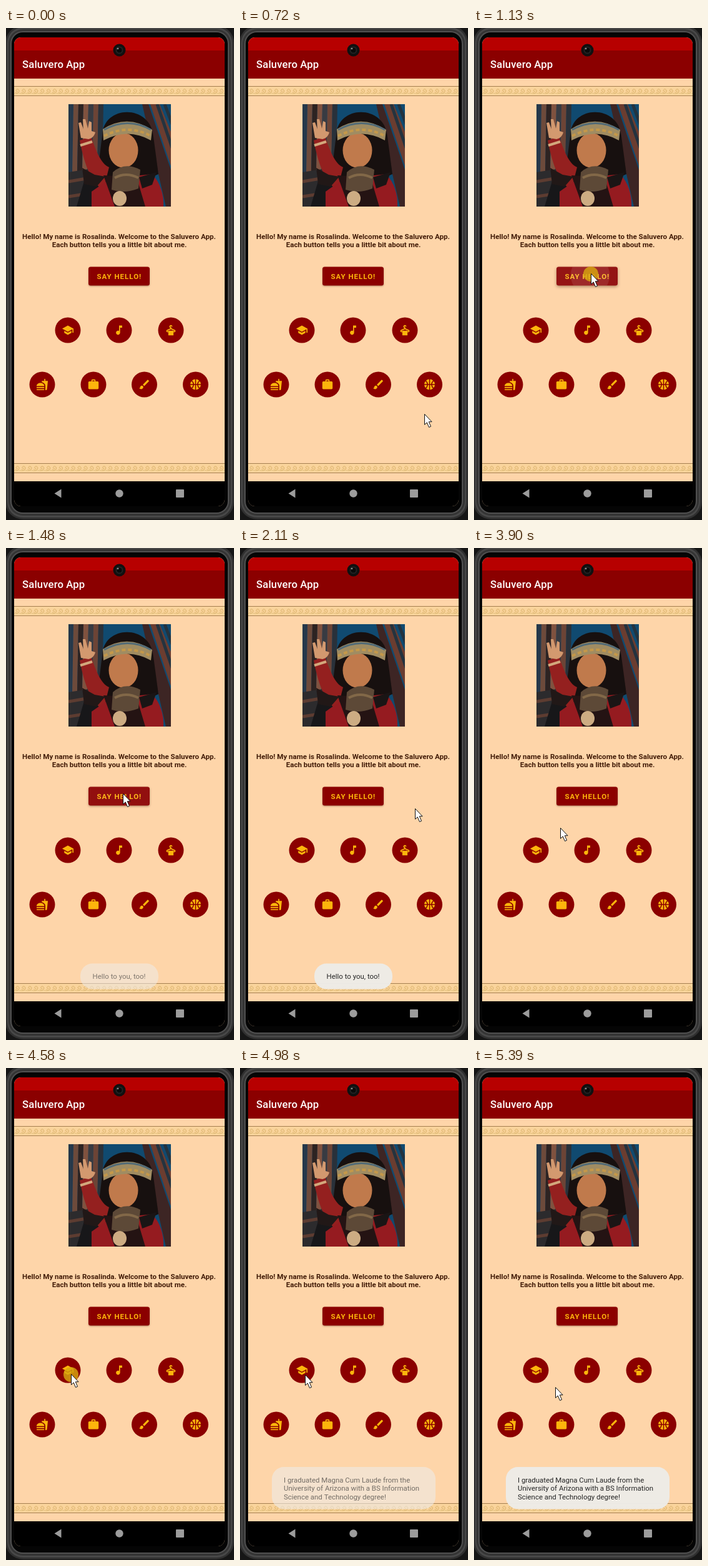
Animation of 365 by 788 pixels, one loop 8 s. Source, as an HTML page with a canvas:

```html
<!DOCTYPE html>
<html lang="en">
<head>
<meta charset="utf-8">
<title>Saluvero App</title>
<style>
  html, body { margin: 0; width: 100%; height: 100%; overflow: hidden; background: #000; }
  canvas { display: block; width: 365px; height: 788px; }
</style>
</head>
<body>
<canvas id="stage" width="365" height="788"></canvas>
<script>
const ctx = document.getElementById('stage').getContext('2d');
const LOOP = 8000;
const FONT = 'Roboto, sans-serif';
const RED = '#8b0000', GOLD = '#fdb50c', PAPER = '#fed5a9';

// Frame clock: 70 ms steps counted from each anchor
const ANCHORS = [0, 180, 590, 1130, 2570, 4380, 4580, 4980, 5390];

// Pointer path: time, x, y
const PATH = [
  [590, 317, 676], [730, 272, 560], [870, 232, 450], [940, 207, 402], [1010, 187, 393],
  [1620, 187, 393], [1760, 208, 398], [1900, 246, 409], [2040, 276, 416], [2110, 280, 417],
  [2500, 280, 417], [2710, 254, 430], [2990, 225, 444], [3200, 225, 444], [3270, 217, 445],
  [3480, 199, 446], [3620, 178, 446], [3760, 153, 447], [3900, 138, 448], [4040, 133, 457],
  [4180, 118, 474], [4380, 104, 488], [4580, 104, 490], [4980, 104, 491], [5050, 105, 492],
  [5190, 120, 505], [5330, 130, 511]
];

const ICONS = {
  school: 'M5 13.18v4L12 21l7-3.82v-4L12 17l-7-3.82zM12 3L1 9l11 6 9-4.91V17h2V9L12 3z',
  music: 'M12 3v10.55c-.59-.34-1.27-.55-2-.55-2.21 0-4 1.79-4 4s1.79 4 4 4 4-1.79 4-4V7h4V3h-6z',
  hanger: 'M19.56 11.36L13 8.44V7c0-.55-.45-1-1-1s-1-.45-1-1 .45-1 1-1 1 .45 1 1h2c0-1.84-1.66-3.3-3.56-2.95-1.18.22-2.15 1.17-2.38 2.35-.3 1.56.6 2.94 1.94 3.42v.63l-6.56 2.92C3.56 11.74 3 12.61 3 13.56 3 14.93 4.07 16 5.4 16H7v6h10v-6h1.6c1.33 0 2.4-1.07 2.4-2.4 0-.99-.56-1.86-1.44-2.24zM18.58 14H17v-1H7v1H5.42C5.19 14 5 13.81 5 13.58c0-.16.1-.3.24-.38l6.76-3 6.76 3c.15.07.24.21.24.38 0 .23-.19.42-.42.42z',
  food: 'M18.06 22.99h1.66c.84 0 1.53-.64 1.63-1.46L23 5.05h-5V1h-1.97v4.05h-4.97l.3 2.34c1.71.47 3.31 1.32 4.27 2.26 1.44 1.42 2.43 2.89 2.43 5.29v8.05zM1 21.99V21h15.03v.99c0 .55-.45 1-1.01 1H2.01c-.56 0-1.01-.45-1.01-1zm15.03-7c0-8-15.03-8-15.03 0h15.03zM1.02 17h15v2h-15z',
  work: 'M20 6h-4V4c0-1.11-.89-2-2-2h-4c-1.11 0-2 .89-2 2v2H4c-1.11 0-1.99.89-1.99 2L2 19c0 1.11.89 2 2 2h16c1.11 0 2-.89 2-2V8c0-1.11-.89-2-2-2zm-6 0h-4V4h4v2z',
  brush: 'M7 14c-1.66 0-3 1.34-3 3 0 1.31-1.16 2-2 2 .92 1.22 2.49 2 4 2 2.21 0 4-1.79 4-4 0-1.66-1.34-3-3-3zm13.71-9.37l-1.34-1.34c-.39-.39-1.02-.39-1.41 0L9 12.25 11.75 15l8.96-8.96c.39-.39.39-1.02 0-1.41z'
};
const BUTTONS = [
  ['school', 99, 484], ['music', 181, 484], ['hanger', 264, 484],
  ['food', 58, 571], ['work', 140, 571], ['brush', 221.5, 571], ['ball', 303.5, 571]
];

const clamp = v => Math.max(0, Math.min(1, v));
const ramp = (t, a, b) => clamp((t - a) / (b - a));

function rect(x, y, w, h, fill, r = 0) {
  ctx.fillStyle = fill;
  ctx.beginPath();
  ctx.roundRect(x, y, w, h, r);
  ctx.fill();
}

function oval(x, y, rx, ry, fill) {
  ctx.fillStyle = fill;
  ctx.beginPath();
  ctx.ellipse(x, y, rx, ry, 0, 0, Math.PI * 2);
  ctx.fill();
}

function shape(d, fill) {
  ctx.fillStyle = fill;
  ctx.fill(new Path2D(d), 'evenodd');
}

function line(d, stroke, width) {
  ctx.strokeStyle = stroke;
  ctx.lineWidth = width;
  ctx.stroke(new Path2D(d));
}

function text(str, x, y, font, fill, align = 'left', spacing = 0) {
  ctx.font = `${font} ${FONT}`;
  ctx.letterSpacing = spacing + 'px';
  ctx.textAlign = align;
  ctx.fillStyle = fill;
  ctx.fillText(str, x, y);
}

function drawPhone() {
  rect(0, 0, 365, 788, '#161616');
  rect(-1, -4, 366, 791, '#303030', 28);
  rect(2, -1, 360, 785, '#484848', 25);
  rect(4, 2, 356, 779, '#343434', 23);
  rect(7, 5, 350, 773, '#505050', 20);
  rect(9, 7, 346, 769, '#050505', 18);
}

function drawBand(y) {
  rect(13, y, 337, 16, '#fad49c');
  for (let x = 13; x < 352; x += 9.9) {
    ctx.strokeStyle = '#d4ab62';
    ctx.lineWidth = 0.9;
    ctx.beginPath();
    for (let a = 0; a <= 9; a += 0.4) {
      const r = 0.6 + a * 0.4;
      ctx.lineTo(x + 5 + r * Math.cos(a), y + 7.5 + r * Math.sin(a));
    }
    ctx.stroke();
    line(`M${x - 2} ${y + 11.5}q5 1.5 9 0`, '#e3c17c', 1);
  }
  rect(13, y, 337, 1, '#a57f50');
  rect(13, y + 15, 337, 1, '#a57f50');
}

function drawPhoto() {
  ctx.save();
  ctx.beginPath();
  ctx.rect(100, 122, 164, 164);
  ctx.clip();
  rect(100, 122, 164, 164, '#104a70');
  const weave = ['#25384a', '#6d4a3b', '#2d2322', '#80523f', '#383b42', '#6c4436', '#29313a'];
  weave.forEach((c, i) => shape(`M${100 + i * 8} 122h8l-3 164h-8z`, c));
  shape('M218 122h10l36 105v59h-8z', '#3d2524');
  shape('M231 122h15l18 44v55z', '#6b3d30');
  line('M242 122l24 70M254 122l12 32', '#24333f', 5);
  shape('M100 231l38-6 16 61h-54z', '#2c2b2d');
  line('M100 246l46-8M100 270l52-8', '#5d3c31', 5);
  shape('M113 286l14-47 22-4 8 51z', '#171719');
  shape('M154 172c2-50 78-50 82 2l8 60-35 16h-47l-15-22z', '#17100f');
  shape('M118 180l18-6c8 22 16 44 29 49l-9 36c-22-12-32-48-38-79z', '#94201f');
  line('M119 188l19-6', '#d3a87c', 4);
  shape('M120 176l-4-24 4-1 4 11-1-16 4 0 4 15 2-12 4 2v14l6 2c-2 7-6 10-11 11z', '#d3996f');
  shape('M137 262l30-21 67-7c13 14 19 33 18 52H137z', '#951b20');
  shape('M156 236l53 3 14 47h-49z', '#241313');
  oval(188, 196, 23.5, 28, '#c07a4c');
  shape('M155 162q39-25 79 1l-2 17q-37-21-76 0z', '#a08c62');
  line('M157 163q38-21 75 0', '#526b77', 3);
  ctx.setLineDash([6, 4]);
  line('M157 173q38-20 75 0', '#c4984a', 4);
  ctx.setLineDash([]);
  shape('M171 231q19-17 44-4l-3 30q-22 9-43 2z', '#5d4937');
  line('M174 240q18-10 38 0', '#826848', 4);
  shape('M122 224l20 11 17 3-14 16-20-4z', '#211817');
  shape('M213 239l28-8-7 20-16 6z', '#1a1515');
  oval(182, 273, 11, 12, '#cdac83');
  ctx.restore();
}

function drawIcon(name, x, y) {
  oval(x, y, 20.5, 20.5, RED);
  ctx.save();
  ctx.translate(x, y);
  if (name === 'ball') {
    oval(0, 0, 8.5, 8.5, GOLD);
    line('M0-9V9M-9 0H9M-6.5-6.5Q0 0-6.5 6.5M6.5-6.5Q0 0 6.5 6.5', RED, 1.5);
  } else {
    ctx.scale(0.82, 0.82);
    ctx.translate(-12, -12);
    shape(ICONS[name], GOLD);
  }
  ctx.restore();
}

function drawHelloButton(t) {
  const lift = ramp(t, 1010, 1130) * (1 - ramp(t, 1340, 1550));
  ctx.save();
  ctx.shadowColor = 'rgba(60,20,0,.4)';
  ctx.shadowBlur = 2.5 + lift * 3;
  ctx.shadowOffsetY = 1 + lift;
  rect(132, 382.5, 98, 30, RED, 3.5);
  ctx.restore();
  text('SAY HELLO!', 145.5, 402, '700 11.5px', GOLD, 'left', 1);
  if (!lift) return;
  ctx.save();
  ctx.beginPath();
  ctx.roundRect(132, 382.5, 98, 30, 3.5);
  ctx.clip();
  rect(132, 382, 98, 31, `rgba(255,255,255,${0.08 * lift})`);
  const r = 10 + 56 * ramp(t, 1050, 1260);
  oval(186, 396, r, r, `rgba(255,255,255,${0.09 * lift})`);
  ctx.restore();
}

function drawScreen(t) {
  ctx.save();
  ctx.beginPath();
  ctx.roundRect(13, 15, 337, 751, 11);
  ctx.clip();
  rect(13, 15, 337, 751, PAPER);
  rect(13, 15, 337, 21, '#b70000');
  rect(13, 36, 337, 45, RED);
  text('Saluvero App', 26, 64, '500 16.7px', '#fff', 'left', 0.15);
  drawBand(93);
  drawBand(697);
  drawPhoto();
  text('Hello! My name is Rosalinda. Welcome to the Saluvero App.', 181, 337.5, '700 11.6px', '#421c08', 'center');
  text('Each button tells you a little bit about me.', 181.5, 351, '700 11.6px', '#421c08', 'center');
  drawHelloButton(t);
  BUTTONS.forEach(b => drawIcon(...b));
  rect(13, 726, 337, 40, '#000');
  shape('M77.5 745.5l11-7v14z', '#9c9c9c');
  oval(181.5, 745.5, 6.2, 6.2, '#9c9c9c');
  rect(272, 739, 13, 13, '#9c9c9c', 1);
  ctx.restore();

  oval(181.5, 35.5, 10, 10, '#101010');
  oval(181.5, 35.5, 6, 6, '#232323');
  oval(181.5, 35.5, 4, 4, '#0a0a0a');
  oval(179, 33, 1.5, 1.2, '#8c8c8c');
}

function drawToast(lines, x, y, w, h, tx, alpha) {
  if (!alpha) return;
  ctx.globalAlpha = alpha;
  rect(x, y, w, h, 'rgba(238,236,232,.97)', 19.5);
  lines.forEach((s, i) => text(s, tx, y + 24.5 + i * 13.5, '400 11.45px', '#252525'));
  ctx.globalAlpha = 1;
}

function pointerAt(t) {
  if (t >= 180 && t < 250) return [361, 736];
  if (t < PATH[0][0]) return null;
  const i = PATH.findIndex(k => k[0] > t);
  if (i < 0) return PATH[PATH.length - 1].slice(1);
  const [a, x, y] = PATH[i - 1], [b, x2, y2] = PATH[i];
  const p = ramp(t, a, b);
  return [x + (x2 - x) * p, y + (y2 - y) * p];
}

function drawPointer(t) {
  const pos = pointerAt(t);
  if (!pos) return;
  const [x, y] = pos.map(Math.round);
  if ((t >= 1010 && t < 1200) || (t >= 4580 && t < 4780)) oval(x, y + 1, 12, 12, 'rgba(214,166,16,.82)');
  ctx.save();
  ctx.translate(x + 0.5, y + 0.5);
  const arrow = 'M0 0V16.8L3.8 13.4 7 21 10 19.7 6.8 12.2H11.6Z';
  shape(arrow, '#fff');
  line(arrow, '#111', 1);
  ctx.restore();
}

function snap(t) {
  const a = ANCHORS.filter(v => v <= t).pop();
  return a + Math.floor((t - a) / 70) * 70;
}

function render(now) {
  const t = snap(now % LOOP);
  drawPhone();
  drawScreen(t);
  drawToast(['Hello to you, too!'], 119, 665.5, 125, 41, 138.5,
    ramp(t, 1350, 1580) * (1 - ramp(t, 3450, 3760)));
  drawToast([
    'I graduated Magna Cum Laude from the',
    'University of Arizona with a BS Information',
    'Science and Technology degree!'
  ], 51, 639, 262, 67.5, 70, ramp(t, 4770, 5110));
  drawPointer(t);
}

const start = performance.now();
function tick() {
  render(performance.now() - start);
  requestAnimationFrame(tick);
}
tick();
</script>
</body>
</html>
```
